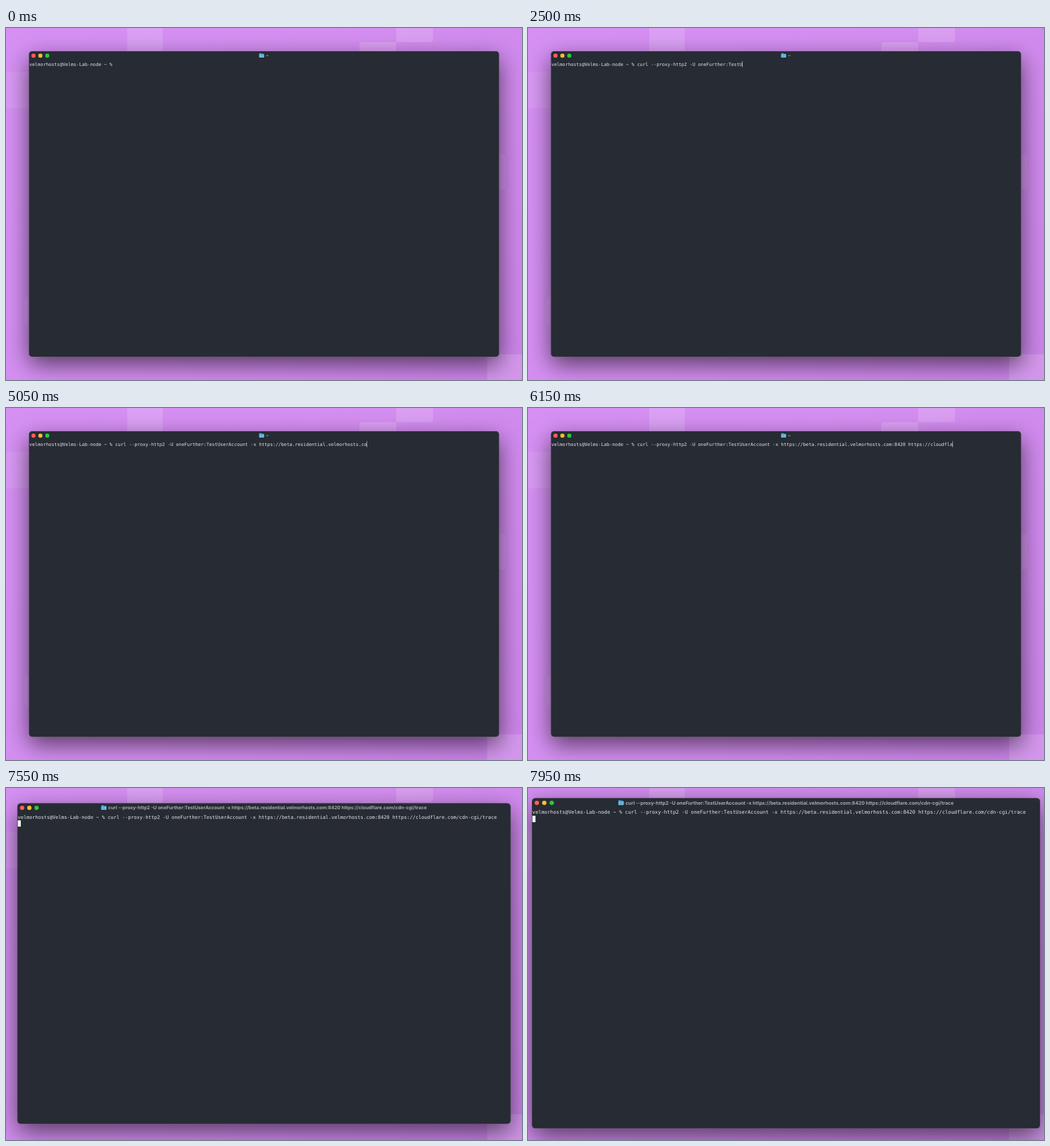
An HTML page with a canvas that plays this animation: 800x547 px, repeating every 8 s.

```html
<!DOCTYPE html>
<html lang="en">
<head>
<meta charset="utf-8">
<title>Terminal</title>
<style>
  html, body { margin: 0; width: 100%; height: 100%; overflow: hidden; background: #d28cf0; }
  canvas { display: block; width: 800px; height: 547px; }
</style>
</head>
<body>
<canvas id="stage"></canvas>
<script>
const W = 800, H = 547, LOOP = 8000, STEP = 50;
const canvas = document.getElementById('stage');
const ctx = canvas.getContext('2d');
const dpr = window.devicePixelRatio || 1;
canvas.width = W * dpr;
canvas.height = H * dpr;

const PROMPT = 'velmorhosts@Velms-Lab-node ~ % ';
const COMMAND = 'curl --proxy-http2 -U oneFurther:TestUserAccount -x ' +
  'https://beta.residential.velmorhosts.com:8420 https://cloudflare.com/cdn-cgi/trace';
const MONO = '7.13px "DejaVu Sans Mono", monospace';
const TITLE = 'bold 6.95px Inter, sans-serif';

// Typing rhythm: [time in ms, characters typed]
const KEYS = [
  [150, 0], [500, 5], [640, 5], [1100, 13], [1450, 19], [2300, 33], [2500, 38],
  [3150, 52], [4050, 72], [4850, 88], [4900, 88], [5300, 98], [5400, 98],
  [5800, 106], [5900, 106], [6150, 114], [6600, 121], [6700, 121], [7250, 134]
];
const ENTER = 7400;
const ZOOM = { start: 7350, gain: 0.0823, rate: 0.0101, x: 400, y: 289 };

function typedAt(t) {
  if (t <= KEYS[0][0]) return 0;
  for (let i = 1; i < KEYS.length; i++) {
    const [t0, n0] = KEYS[i - 1], [t1, n1] = KEYS[i];
    if (t <= t1) return Math.floor(n0 + (n1 - n0) * (t - t0) / (t1 - t0) + 1e-6);
  }
  return COMMAND.length;
}

// Critically damped spring
function zoomAt(t) {
  const x = Math.max(0, t - ZOOM.start) * ZOOM.rate;
  return 1 + ZOOM.gain * (1 - (1 + x) * Math.exp(-x));
}

function box(x, y, w, h, r, fill) {
  ctx.beginPath();
  ctx.roundRect(x, y, w, h, r);
  ctx.fillStyle = fill;
  ctx.fill();
}

function text(str, x, y, font, fill) {
  ctx.font = font;
  ctx.fillStyle = fill;
  ctx.fillText(str, x, y);
}

function drawBackdrop() {
  const g = ctx.createLinearGradient(0, 0, W, H);
  g.addColorStop(0, '#d690f4');
  g.addColorStop(0.5, '#d48ef1');
  g.addColorStop(1, '#cb84e9');
  ctx.fillStyle = g;
  ctx.fillRect(0, 0, W, H);
  const light = 'rgba(255,255,255,0.15)', faint = 'rgba(255,255,255,0.08)';
  box(188, -10, 55, 66, 0, light);
  box(605, -10, 57, 32, [0, 0, 4, 0], light);
  box(548, 22, 57, 34, [4, 0, 0, 0], light);
  box(-10, 68, 66, 57, 0, faint);
  box(720, 196, 54, 55, 5, faint);
  box(29, 417, 54, 46, 5, faint);
  box(746, 507, 60, 50, 0, light);
}

function drawFolder(x, y) {
  box(x, y, 4, 3, 0.8, '#4596c4');
  box(x, y + 0.9, 7.6, 6, 0.8, '#4596c4');
  box(x, y + 1.9, 7.6, 5.1, 0.8, '#67bbe3');
  box(x + 2.8, y + 3.6, 2, 1.5, 0.3, '#4a9ecb');
}

function drawTitle(label) {
  ctx.font = TITLE;
  const left = 400 - (ctx.measureText(label).width + 10.2) / 2;
  drawFolder(left, 39.1);
  text(label, left + 10.2, 45.4, TITLE, '#a6aaaf');
}

function drawWindow(scale) {
  ctx.save();
  ctx.shadowColor = 'rgba(0,0,0,0.6)';
  ctx.shadowBlur = 36 * scale * dpr;
  ctx.shadowOffsetY = 12 * scale * dpr;
  box(35.5, 36, 729, 475, 5, '#272b33');
  ctx.restore();
  ctx.beginPath();
  ctx.roundRect(35.75, 36.25, 728.5, 474.5, 5);
  ctx.lineWidth = 0.5;
  ctx.strokeStyle = 'rgba(255,255,255,0.16)';
  ctx.stroke();
  ['#ff5f57', '#febc2e', '#28c840'].forEach((c, i) =>
    box(39.4 + i * 10.7, 39.8, 6.4, 6.4, 3.2, c));
}

function draw(t) {
  const entered = t >= ENTER;
  const scale = zoomAt(t);
  ctx.setTransform(dpr, 0, 0, dpr, 0, 0);
  ctx.textRendering = 'geometricPrecision';
  drawBackdrop();
  ctx.translate(ZOOM.x, ZOOM.y);
  ctx.scale(scale, scale);
  ctx.translate(-ZOOM.x, -ZOOM.y);
  drawWindow(scale);
  drawTitle(entered ? COMMAND : '~');

  const line = PROMPT + COMMAND.slice(0, typedAt(t));
  text(line, 36.2, 58.9, MONO, '#e4e6e8');
  if (entered) {
    box(36.2, 61.5, 4.5, 9.3, 0, '#f2f3f4');
  } else if (t >= STEP) {
    box(36.2 + ctx.measureText(line).width - 0.3, 51.6, 0.7, 9.4, 0, '#c8cbcf');
  }
}

function tick() {
  const t = performance.now() % LOOP;
  draw(Math.floor(t / STEP) * STEP);
  requestAnimationFrame(tick);
}
tick();
</script>
</body>
</html>
```
